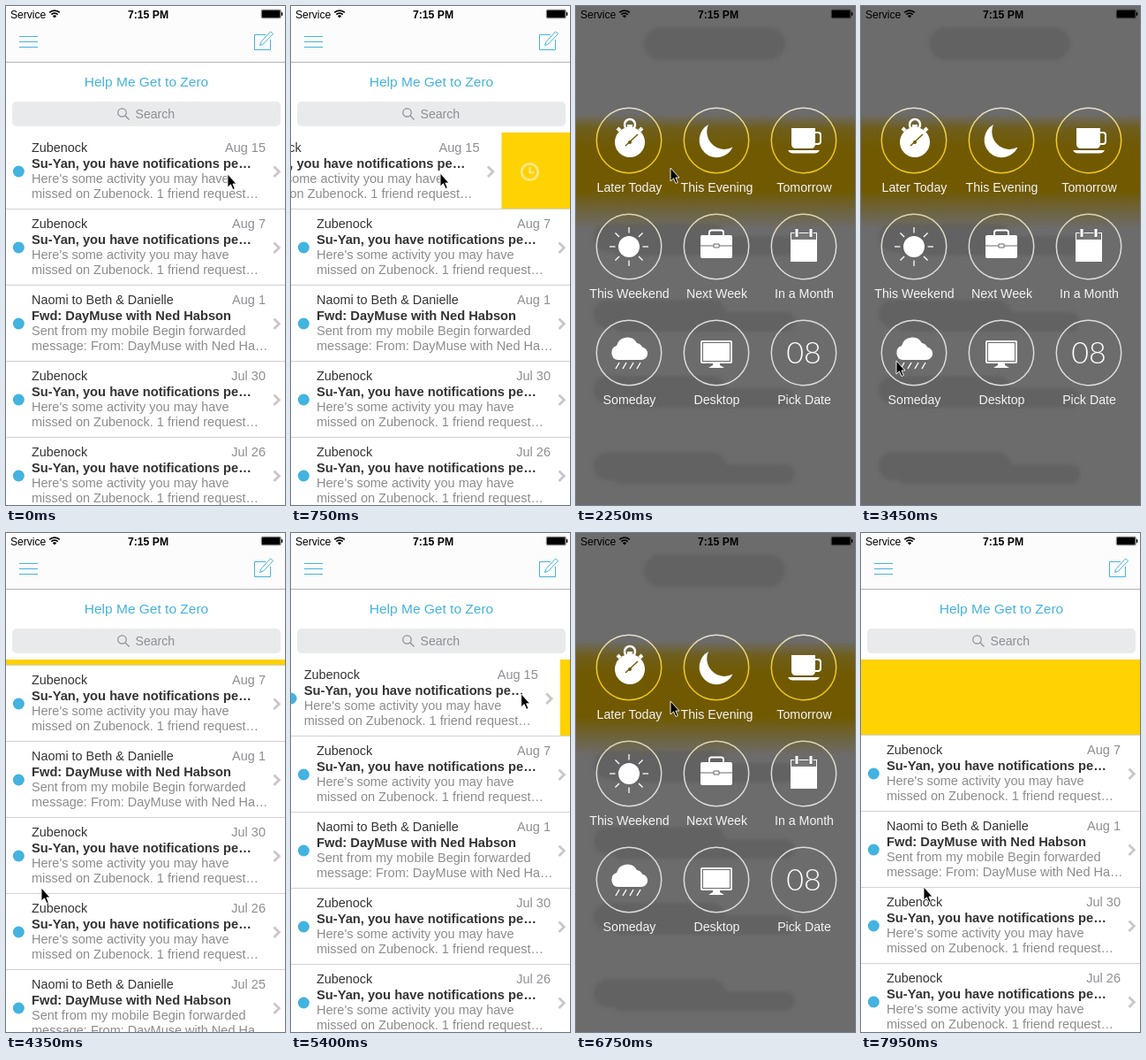
An HTML page for the animation above (8 s loop, 316 by 564 pixels).

```html
<!DOCTYPE html>
<html lang="en">
<head>
<meta charset="utf-8">
<title>Snooze a message</title>
<style>
  html, body { margin: 0; width: 100%; height: 100%; overflow: hidden; background: #fff; }
  svg { display: block; width: 100vw; height: 100vh; font-family: "Liberation Sans", Arial, sans-serif; }
  .sender { font-size: 14.4px; fill: #333; }
  .date { font-size: 14.5px; fill: #8e8e93; text-anchor: end; }
  .subject { font-size: 14.7px; font-weight: bold; fill: #333; }
  .body { font-size: 14.5px; fill: #8c8c8c; }
  .label { font-size: 14.2px; fill: #f4f4f4; text-anchor: middle; }
  .blue { fill: none; stroke: #43b3df; }
  .gray { fill: none; stroke: #8e8e93; stroke-width: 1.2; }
  .rule { stroke: #d2d2d4; }
  .dark { fill: none; stroke: #6a6a6a; }
  .white { fill: none; stroke: #fff; }
  .solid { fill: #fff; }
</style>
</head>
<body>
<svg viewBox="0 0 316 564">
  <defs>
    <linearGradient id="band" x2="0" y2="1">
      <stop offset="0" stop-color="#705900" stop-opacity="0"/>
      <stop offset=".13" stop-color="#705900" stop-opacity=".75"/>
      <stop offset=".3" stop-color="#705900"/>
      <stop offset=".66" stop-color="#705900"/>
      <stop offset=".8" stop-color="#705900" stop-opacity=".55"/>
      <stop offset="1" stop-color="#705900" stop-opacity="0"/>
    </linearGradient>
    <linearGradient id="ring" gradientUnits="userSpaceOnUse" x1="0" y1="114" x2="0" y2="274">
      <stop offset="0" stop-color="#e4e2da"/>
      <stop offset=".16" stop-color="#ecd15c"/>
      <stop offset=".32" stop-color="#f2c80c"/>
      <stop offset=".48" stop-color="#efc91c"/>
      <stop offset=".78" stop-color="#ddd6b4"/>
      <stop offset="1" stop-color="#dcdcdc"/>
    </linearGradient>
    <filter id="soft"><feGaussianBlur stdDeviation="2"/></filter>
  </defs>

  <rect width="316" height="564" fill="#fff"/>
  <rect id="gold" y="143" width="319" fill="#ffd204"/>
  <g id="clock" class="white" stroke-width="2.8">
    <circle r="9.2"/>
    <path d="M0 -5.5V.8H5" stroke-width="2.3"/>
  </g>
  <g id="first"></g>
  <g id="rest"></g>

  <rect width="316" height="63" fill="#fcfcfc"/>
  <path d="M0 63.5H316" stroke="#b4b4b6"/>
  <path class="blue" stroke-width="1.2" d="M15 34.5H36M15 40.5H36M15 46.5H36"/>
  <path class="blue" d="M294 32.5H281.5V49.5H299.5V38M287.5 44.5L289 40.5L299.5 29L302.5 31.5L291.5 43Z"/>
  <text x="159" y="91" text-anchor="middle" font-size="15.5" fill="#43b3df">Help Me Get to Zero</text>
  <rect x="7" y="108" width="304" height="28" rx="5" fill="#e9eaeb"/>
  <path class="gray" d="M135 124L139.5 128.5"/>
  <circle class="gray" cx="131.5" cy="120.5" r="4.7"/>
  <text x="146.5" y="127" font-size="14.1" fill="#8e8e93">Search</text>

  <g id="menu">
    <rect width="316" height="564" fill="#6c6c6c"/>
    <g id="smudges" filter="url(#soft)" fill="#626262"></g>
    <rect y="122" width="316" height="130" fill="url(#band)"/>
    <g id="options"></g>
  </g>

  <text x="5" y="13.5" font-size="12.1">Service</text>
  <text x="161" y="13.5" font-size="12.2" font-weight="bold" text-anchor="middle">7:15 PM</text>
  <path d="M55 13.5L52.8 11.2A3.2 3.2 0 0 1 57.2 11.2Z"/>
  <path d="M51.3 9.6A5.3 5.3 0 0 1 58.7 9.6M49.2 7.4A8.3 8.3 0 0 1 60.8 7.4" fill="none" stroke="#000" stroke-width="1.7"/>
  <rect x="289.3" y="4.3" width="21.9" height="9.4" rx="1.5" fill="none" stroke="#000" stroke-width=".6"/>
  <rect x="290" y="5" width="20.5" height="8" rx=".8"/>
  <rect x="311.9" y="7" width="1.4" height="4" rx=".7"/>
  <path id="cursor" d="M0 0V15L3.5 11.8L6 17.5L8.3 16.5L5.9 11H10Z" stroke="#fff" stroke-width=".9"/>
</svg>
<script>
const LOOP = 8000, STEP = 150, TOP = 143, ROW = 86, WIDTH = 319;
const $ = id => document.getElementById(id);
const set = (id, attrs) => Object.entries(attrs).forEach(([k, v]) => $(id).setAttribute(k, v));
const move = (x, y) => `translate(${x} ${y})`;

const social = ["Zubenock", "Su-Yan, you have notifications pe…",
  "Here's some activity you may have", "missed on Zubenock. 1 friend request…"];
const forward = ["Naomi to Beth &amp; Danielle", "Fwd: DayMuse with Ned Habson",
  "Sent from my mobile Begin forwarded", "message: From: DayMuse with Ned Ha…"];

const row = (date, [sender, subject, line1, line2], y) => `<g transform="${move(0, y)}">
  <circle cx="14.3" cy="44" r="6.5" fill="#43b3df"/>
  <text class="sender" x="29" y="22">${sender}</text>
  <text class="date" x="294" y="22">${date}</text>
  <text class="subject" x="29" y="39.5">${subject}</text>
  <text class="body" x="29" y="57">${line1}</text>
  <text class="body" x="29" y="74">${line2}</text>
  <path d="M303.5 38.5L309.3 44.2L303.5 50" fill="none" stroke="#c7c7cc" stroke-width="2.8"/>
  <path class="rule" d="M0 86.5H${WIDTH}"/></g>`;

$("first").innerHTML = row("Aug 15", social, TOP);
$("rest").innerHTML = `<path class="rule" d="M0 ${TOP + .5}H316"/>` +
  ["Aug 7", "Aug 1", "Jul 30", "Jul 26", "Jul 25"]
    .map((date, i) => row(date, i % 3 === 1 ? forward : social, TOP + ROW * i)).join("");

// Icons are drawn around the centre of their ring.
const rays = [...Array(8).keys()].map(i => `<path d="M0 -15.5V-22" transform="rotate(${i * 45})"/>`).join("");
const rain = [...Array(4).keys()].map(i => `<path d="M${i * 8 - 11} 11l-4 7"/>`).join("");
const options = {
  "Later Today": `<circle class="solid" cx="1" cy="2" r="17"/>
    <circle class="white" cx="1" cy="-18" r="6" stroke-width="2.5"/><path class="solid" d="M-2 -18H4V-13H-2Z"/>
    <path class="white" d="M-13 -14L-10 -11M15 -14L12 -11" stroke-width="4"/>
    <path d="M-4 6L10 -7" stroke="#705900" stroke-width="1.4"/><circle cx="1" cy="2" r="2" fill="#705900"/>`,
  "This Evening": `<path class="solid" d="M-9 -18A19.8 19.8 0 1 0 18.5 7.5A19.8 19.8 0 0 1 -9 -18Z"/>`,
  "Tomorrow": `<path class="solid" d="M-14 -14H13V4Q13 9 8 9H-9Q-14 9 -14 4ZM-18 11H18Q16 14.5 12 14.5H-12Q-16 14.5 -18 11Z"/>
    <path class="white" d="M13 -9H16Q19 -9 19 -6V1Q19 4 16 4H13" stroke-width="2"/>`,
  "This Weekend": `<circle class="solid" r="12"/><g class="white" stroke-width="1.3">${rays}</g>`,
  "Next Week": `<rect class="solid" x="-18" y="-13" width="36" height="26" rx="2"/>
    <path class="white" d="M-8 -13V-16Q-8 -18.5 -5.5 -18.5H5.5Q8 -18.5 8 -16V-13" stroke-width="2"/>
    <path class="dark" d="M-18 -1H-3M3 -1H18M-3 -3H3V1H-3Z"/>`,
  "In a Month": `<path class="solid" d="M-15 -16H15V17H-15Z"/><path d="M-14 -15H14V-8H-14Z" fill="#777"/>
    <path class="dark" d="M-8 -21V-10M8 -21V-10" stroke-width="5"/>
    <path class="white" d="M-8 -20V-11M8 -20V-11" stroke-width="3"/>`,
  "Someday": `<path class="solid" d="M-13 8A8.3 8.3 0 0 1 -14 -8A12.5 12.5 0 0 1 9 -11A8 8 0 0 1 15 -6.5A7.3 7.3 0 0 1 14 8Z"/>
    <g class="white" stroke-width="1.4">${rain}</g>`,
  "Desktop": `<rect class="solid" x="-18" y="-14" width="36" height="26" rx="2"/>
    <rect class="dark" x="-15.5" y="-11.5" width="31" height="21"/>
    <path class="solid" d="M-4 12H4V14L9 17H-9L-4 14Z"/>`,
  "Pick Date": `<text class="solid" y="12" text-anchor="middle" font-family="Lato, sans-serif" font-weight="300" font-size="34">08</text>`
};
$("options").innerHTML = Object.entries(options).map(([name, icon], i) => {
  const x = 60 + i % 3 * 99, y = 152 + Math.floor(i / 3) * 120;
  return `<g transform="${move(x, y)}">${icon}</g>
    <circle cx="${x}" cy="${y}" r="36.7" fill="none" stroke="url(#ring)" stroke-width="1.5"/>
    <text class="label" x="${x + .5}" y="${y + 58}">${name}</text>`;
}).join("");

const smudge = (x, y, w, h) => `<rect x="${x}" y="${y}" width="${w}" height="${h}" rx="${h / 2}"/>`;
$("smudges").innerHTML = smudge(77, 24, 160, 37) + [1, 2, 3, 4].map(i =>
  smudge(20, 160 + ROW * i, 150, 32) + smudge(40, 174 + ROW * i, 208, 22)).join("");

// Each pass drags the first row aside, opens the menu, then closes the gap.
const passes = [
  { drag: 0, open: 2100, shut: 4050, end: 4950 },
  { drag: 5125, open: 6600, shut: 7950, end: LOOP }
];
const DRAG_TIME = 1500, DRAG = -161, SHUT_TIME = 394, SHUT_LEAD = 27;

// Pointer moves: start, end, x, y
const moves = [
  [0, 1500, 87, 188], [1800, 2250, 107, 183], [2700, 3300, 50, 478], [3300, 3450, 40, 401],
  [4350, 4950, 275, 182], [5125, 6600, 118, 180], [6600, 6750, 107, 190], [7050, 7650, 71, 400]
];

const progress = (t, from, to) => Math.max(0, Math.min(1, (t - from) / (to - from)));
const ease = (t, from, to) => {
  const u = progress(t, from, to);
  return u * u * (3 - 2 * u);
};
const sway = u => (1 - Math.cos(Math.PI * u)) / 2;

const pointerAt = t => moves.reduce(([x, y], [from, to, toX, toY]) => {
  const u = ease(t, from, to);
  return [x + (toX - x) * u, y + (toY - y) * u];
}, [251, 190]);

function draw(time) {
  const t = Math.floor((time % LOOP + 2) / STEP) * STEP;
  const { drag, open, shut } = passes.find(p => t < p.end);
  const released = t >= open;
  const off = released ? -WIDTH : DRAG * ease(t, drag, drag + DRAG_TIME);
  const closing = progress(t, shut - SHUT_LEAD, shut - SHUT_LEAD + SHUT_TIME);
  const gap = Math.round(ROW * (1 - sway(closing)));

  set("first", { transform: move(off, 0) });
  set("gold", { x: WIDTH + off, height: gap });
  set("clock", { transform: move(WIDTH + off + 32, 187.5), opacity: released ? 0 : off / DRAG });
  set("rest", { transform: move(0, gap) });
  set("menu", { opacity: released && t < shut ? Math.min(1, .5 + (t - open) / STEP / 2) : 0 });
  set("cursor", { transform: move(...pointerAt(t)) });
}

const start = performance.now();
function tick() {
  draw(performance.now() - start);
  requestAnimationFrame(tick);
}
tick();
</script>
</body>
</html>
```
